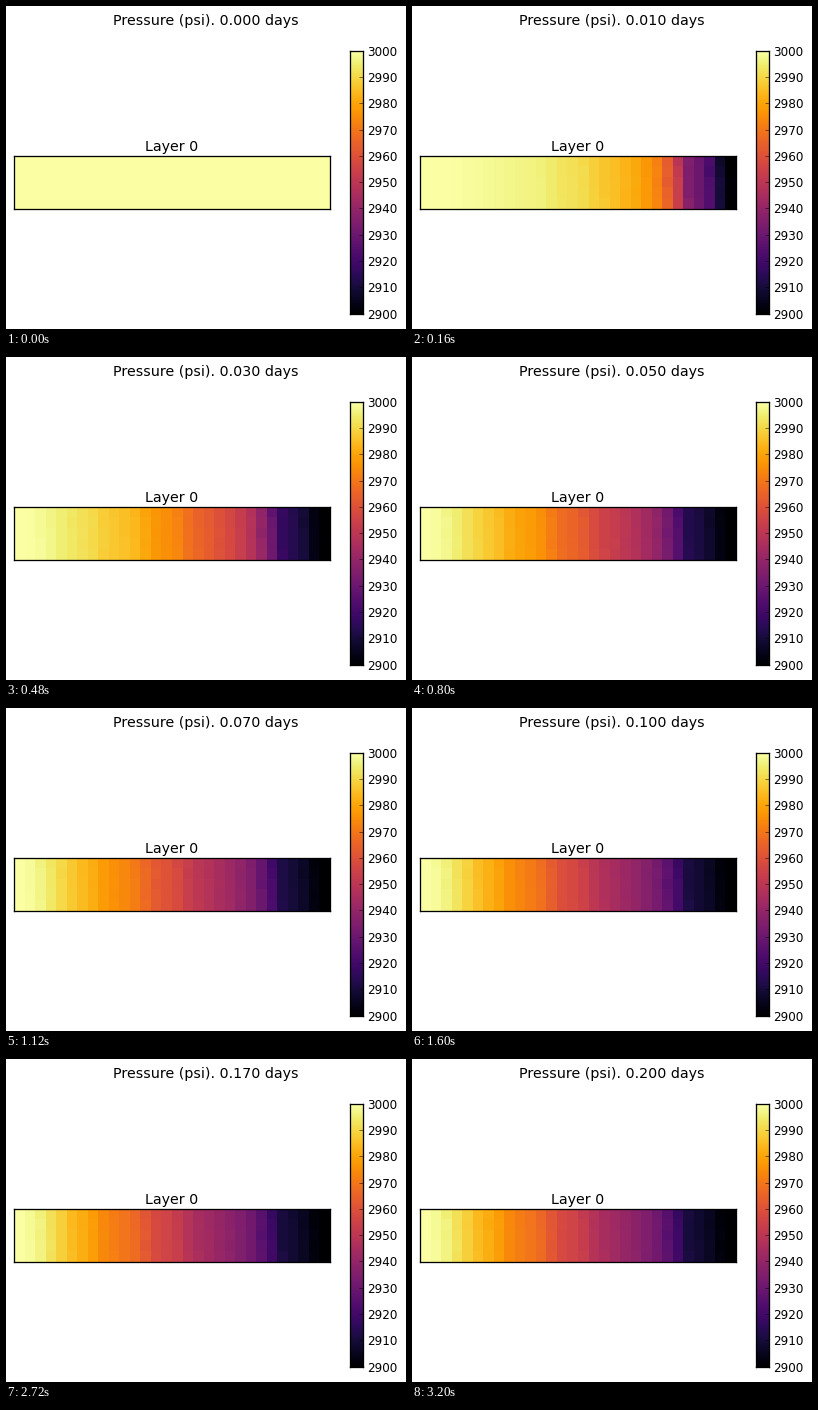
Recreate the animation shown at these times as a matplotlib script. Size 400x323 px, loop 3360 ms.

```python
import numpy as np
import matplotlib.pyplot as plt
from matplotlib.animation import FuncAnimation

W, H, DPI = 400, 323, 72
FRAMES, INTERVAL = 21, 160
ROWS, COLS = 5, 30
P_MIN, P_MAX = 2900, 3000
HEADING = 14.25

# Cell capacity relative to one time step, falling toward the outlet
STORAGE = np.linspace(0.0100, 0.0065, COLS)

plt.rcParams.update({"font.family": "DejaVu Sans", "font.size": 12})

# Steady pressure of each column, measured above P_MIN
STEADY = np.array([100, 98.5, 96, 92.5, 88.5, 84.5, 81.5, 78.5, 74, 71.5,
                   69.5, 67, 62, 57.5, 55.5, 53, 48, 45, 43, 40.5,
                   38, 35, 31.5, 26, 19, 10.5, 8.5, 6.2, 2.2, 0])


def pressure_history():
    """Column pressures per step, by implicit diffusion between fixed ends."""
    trans = 1 / -np.diff(STEADY)
    a = np.eye(COLS)
    for i in range(1, COLS - 1):
        left, right = trans[i - 1], trans[i]
        a[i, i - 1:i + 2] = -left, STORAGE[i] + left + right, -right
    p = np.full(COLS, 100.0)
    steps = [p]
    for _ in range(FRAMES - 1):
        rhs = STORAGE * p
        rhs[0], rhs[-1] = 100, 0
        p = np.linalg.solve(a, rhs)
        steps.append(p)
    return P_MIN + np.array(steps)


def cell_positions():
    """Column coordinate of every cell, slightly uneven from row to row."""
    rng = np.random.default_rng(4)
    row, col = np.mgrid[0:ROWS, 0:COLS]
    return col - 0.05 * (row - 2) + rng.normal(0, 0.06, (ROWS, COLS))


def add_box(left, top, right, bottom):
    ax = fig.add_axes([left / W, 1 - bottom / H,
                       (right - left) / W, (bottom - top) / H])
    for spine in ax.spines.values():
        spine.set_linewidth(1.3)
    return ax


def heading(x, y, text):
    return fig.text(x / W, 1 - y / H, text, size=HEADING, ha="center",
                    va="baseline")


history = pressure_history()
cells = cell_positions()

fig = plt.figure(figsize=(W / DPI, H / DPI), dpi=DPI, facecolor="white")

ax = add_box(8, 150, 324, 203)
image = ax.imshow(np.full((ROWS, COLS), P_MAX), cmap="inferno", vmin=P_MIN,
                  vmax=P_MAX, interpolation="nearest", aspect="auto")
ax.set_xticks([])
ax.set_yticks([])
heading(165.6, 145, "Layer 0")

bar = add_box(344, 44.6, 357, 307.6)
bar.set_facecolor("black")
bar.imshow(np.linspace(P_MIN, P_MAX, 256)[:, None], cmap="inferno",
           origin="lower", extent=(0, 1, P_MIN, P_MAX), aspect="auto",
           interpolation="nearest")
bar.set_xticks([])
bar.set_yticks(range(P_MIN, P_MAX + 1, 10))
bar.yaxis.tick_right()
bar.tick_params(axis="y", direction="in", length=4, width=0.5, pad=4,
                labelsize=12)

title = heading(W / 2, 19.5, "")


def draw(n):
    image.set_data(np.interp(cells, np.arange(COLS), history[n]))
    title.set_text(f"Pressure (psi). {n * 0.01:.3f} days")
    return image, title


anim = FuncAnimation(fig, draw, frames=FRAMES, interval=INTERVAL,
                     repeat=True, repeat_delay=0, blit=False)
plt.show()
```
